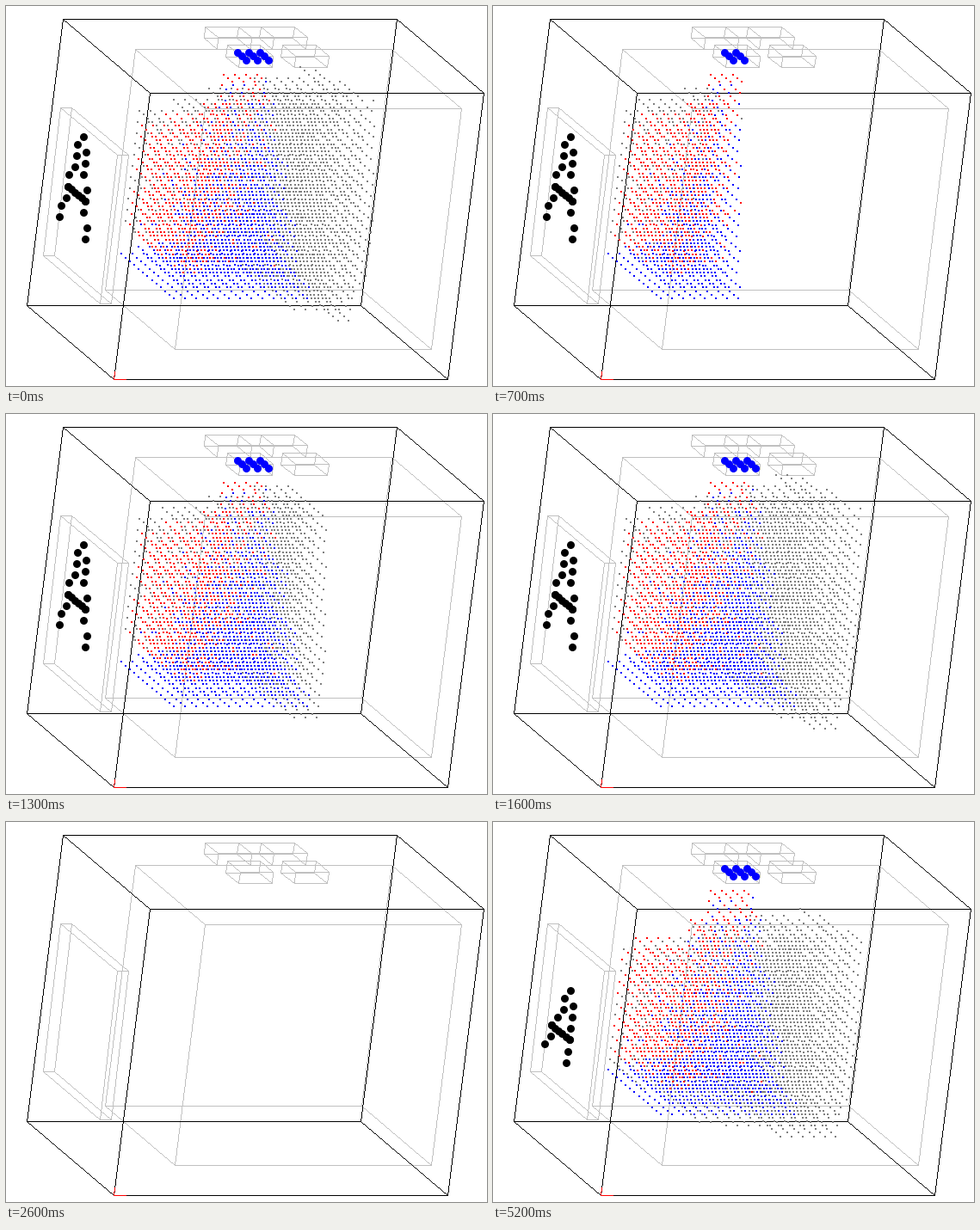
These frames come from a looping animation (559x442 px, 5.4 s). A matplotlib script:

```python
import itertools

import numpy as np
import matplotlib.pyplot as plt
from matplotlib.animation import FuncAnimation
from matplotlib.collections import PolyCollection

W, H, DPI = 559, 442, 100
PX = 72 / DPI
STEP_MS, LOOP_MS = 100, 5400
CYCLE_MS = 300
WIPE_MS, CLEAR_MS, RETURN_MS = 2400, 2600, 4700
LAST_COL, LAST_LAYER = 11, 20
GREY, RED, BLUE, WIRE = "#808080", "#ff0000", "#0000ff", "#c0c0c0"

# Oblique projection of one grid unit along width, depth and height.
AXES = np.array([[12.93, 0], [5.05, 4.3], [-1.6, 12.8]])
ROOM = np.array([66, 15])
LAMP = np.array([269, 54])

I, J, K = (a.ravel() for a in np.meshgrid(
    np.arange(-6, 12), np.arange(-5, 9), np.arange(1, 24), indexing="ij"))
CHANCE = np.random.default_rng(4).random(I.size)
SPOTS = np.round(LAMP + np.column_stack([I, J, K]) @ AXES)
LAMPS = np.array(list(itertools.product(range(3), range(3), [0])))


def stick_figure(apex, rows, left, right):
    """Two dotted legs spreading from the apex, joined by a crossbar."""
    down, along = np.array([-1.62, 13.25]), AXES[1]
    row = np.arange(1, rows + 1)

    def leg(sign, slope, start):
        shift = sign * np.round(slope * row + start)
        return apex + np.outer(row, down) + np.outer(shift, along)

    legs = leg(-1, *left), leg(1, *right)
    bar = round(0.6 * rows) - 1
    crossbar = np.linspace(legs[0][bar], legs[1][bar], 6)
    return np.round(np.vstack([[apex], *legs, crossbar]))


BODIES = {
    "high": stick_figure((90, 152), 8, (0.36, 0.3), (0.36, 0.3)),
    "low": stick_figure((90, 196), 6, (0.66, 0), (0, 1)),
    None: np.empty((0, 2)),
}


def state_at(t):
    """Pose, last column drawn, last layer lit from above, and sway."""
    if CLEAR_MS <= t < RETURN_MS:
        return None, -9, LAST_LAYER, 0
    if t >= RETURN_MS:
        cycle, phase = divmod(t - RETURN_MS + STEP_MS, CYCLE_MS)
        col = 7 * cycle - 2 if phase < STEP_MS else LAST_COL
        return "low", col, min(LAST_LAYER, 11 + 5 * cycle), 0
    if t >= WIPE_MS:
        return "high", 6 - 9 * (t - WIPE_MS) // STEP_MS, LAST_LAYER, 0
    # The sweep is caught three columns further on in every cycle.
    cycle, phase = divmod(t - STEP_MS, CYCLE_MS)
    caught = phase < STEP_MS and cycle < 5
    col = (3 * cycle - 5) % 12 if caught else LAST_COL
    return "high", col, LAST_LAYER, 0.1 * ((cycle + 1) % 4)


def classify(pose, last_col, lit_to, sway):
    """Return masks of the grey, red and blue grid points."""
    high = pose == "high"
    top = (5 - 0.26 * I if high else 6.9 - 0.22 * I) - sway
    floor = (19.5 + 0.3 * I if high else 21.3 + 0.15 * I) + sway
    depth = 1.6 + 0.29 * K + np.where(I < 1, 0.5, 0.2) * (I - 1)
    reach = 11.5 - 0.006 * (K - 12) ** 2 - 0.03 * (J - 4) ** 2
    side = ((K >= top) & (K <= floor) & (I <= reach)
            & (J <= np.minimum(depth, 7.5)))
    above = ((K >= 2) & (K <= lit_to)
             & (I >= -0.8 - 0.27 * K) & (I <= 2.3 + 0.2 * K)
             & (J >= 0.2 - 0.27 * K) & (J <= 1.5 + 0.29 * K))

    mixed = np.clip(0.45 + 0.15 * (3.5 - 0.3 * K - I), 0.03, 0.75)
    if high:
        alone = np.where(I <= 1, 0.9, 0)
        core = (K >= top + 0.9) & (J >= -4)
    else:
        alone = np.clip(0.5 - 0.08 * (I + 3), 0, 0.8)
        core = side
    red = (K < 18.5) & np.where(above, CHANCE < mixed,
                                side & core & (CHANCE < alone))
    blue = above & ~red
    grey = side & ~red & ~blue
    return [mask & (I <= last_col) for mask in (grey, red, blue)]


fig = plt.figure(figsize=(W / DPI, H / DPI), dpi=DPI, facecolor="white")
ax = fig.add_axes([0, 0, 1, 1])
ax.set_xlim(0, W)
ax.set_ylim(H, 0)
ax.axis("off")


def line(start, end, color, z):
    """Draw a hard line, one square per pixel."""
    start, end = np.array(start), np.array(end)
    count = int(np.abs(end - start).max()) + 1
    cells = np.round(np.linspace(start, end, count))
    square = np.array([(0.1, 0.1), (0.9, 0.1), (0.9, 0.9), (0.1, 0.9)])
    ax.add_collection(PolyCollection(
        cells[:, None] + square, facecolors=color, linewidths=0,
        antialiaseds=False, zorder=z), autolim=False)


def prism(corner, along, back, down, color, z):
    """Draw the twelve edges of a box spanned by three vectors."""
    sides = np.array([along, back, down])
    for a, b in itertools.combinations(
            itertools.product((0, 1), repeat=3), 2):
        if sum(abs(p - q) for p, q in zip(a, b)) == 1:
            line(*(np.round(corner + np.array(c) @ sides) for c in (a, b)),
                 color, z)


prism((150, 50), (298, 0), (81, 69), (-35, 280), WIRE, 1)
prism((63, 118), (13, 0), (66, 55), (-20, 172.5), WIRE, 1)
for x, y, wide in [(12, 2, 3), (15, 2, 2), (17, 2, 3), (12, 7, 3), (17, 7, 3)]:
    prism(ROOM + np.array([x, y, 0]) @ AXES, wide * AXES[0],
          3 * AXES[1], 1.05 * AXES[2], WIRE, 1)
prism((66, 15), (388, 0), (101, 86), (-42, 333), "black", 2)
line((126, 425), (125, 434), RED, 3)
line((125, 434), (139, 434), RED, 3)


def dots(color, marker, size, z):
    return ax.plot([], [], ls="", marker=marker, ms=size * PX, mew=0,
                   color=color, antialiased=False, zorder=z)[0]


grains = [dots(color, "s", 2, 4) for color in (GREY, RED, BLUE)]
lamps = dots(BLUE, "o", 9, 5)
body = dots("black", "o", 9, 5)


def update(frame):
    pose, last_col, lit_to, sway = state_at(frame * STEP_MS)
    for artist, mask in zip(grains, classify(pose, last_col, lit_to, sway)):
        artist.set_data(*SPOTS[mask].T)
    shown = LAMPS[LAMPS[:, 0] <= last_col]
    lamps.set_data(*np.round(LAMP + shown @ AXES).T)
    body.set_data(*BODIES[pose].T)
    return [*grains, lamps, body]


anim = FuncAnimation(fig, update, frames=LOOP_MS // STEP_MS,
                     interval=STEP_MS, repeat=True, repeat_delay=0)
plt.show()
```
